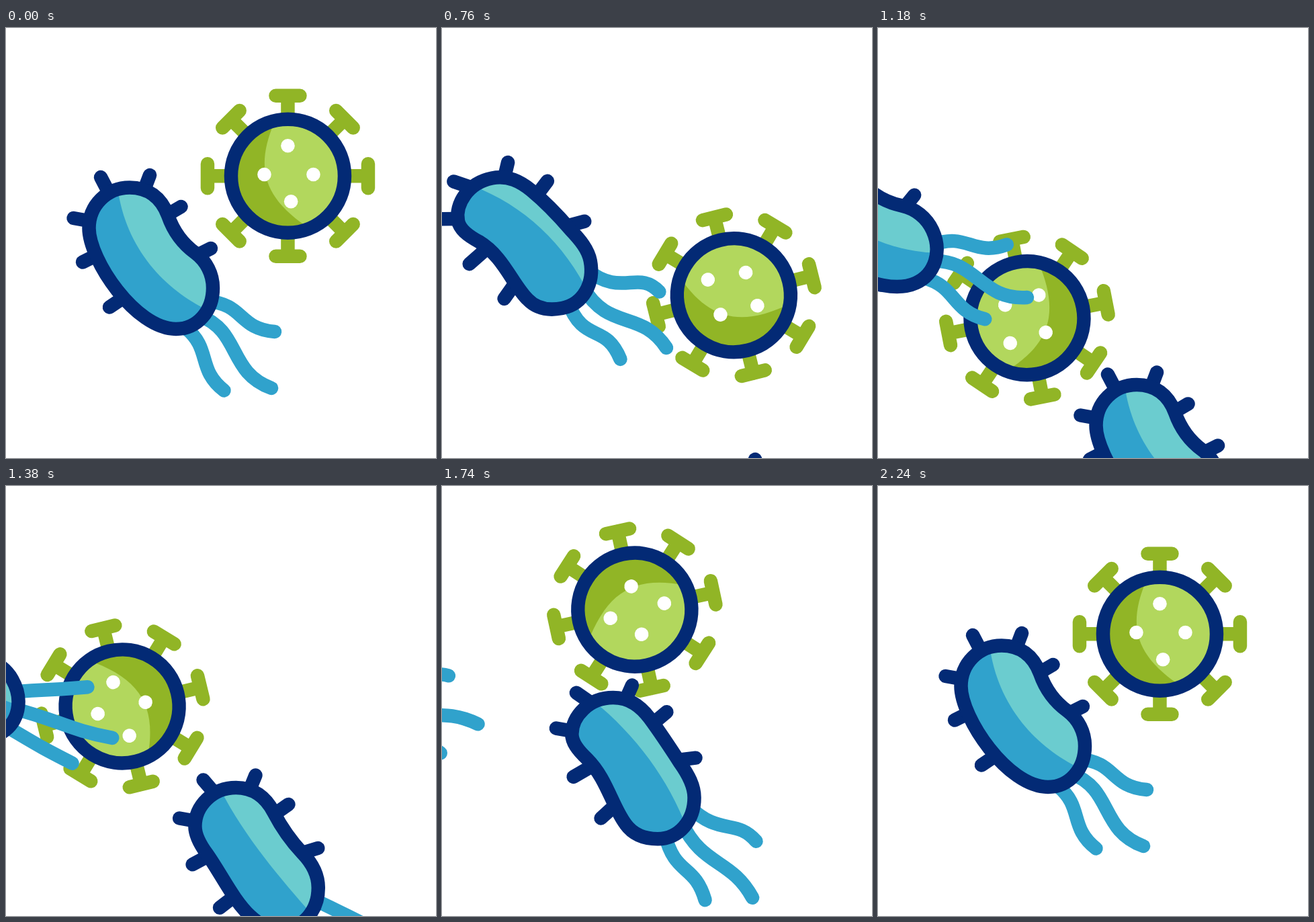
Recreate the animation shown at these times as an HTML page with a canvas. Size 640x640 px, loop 2400 ms.

```html
<!DOCTYPE html>
<html lang="en">
<head>
<meta charset="utf-8">
<title>Microbes</title>
<style>
  html, body { margin: 0; width: 100%; height: 100%; overflow: hidden; background: #fff; }
  canvas { display: block; width: 100vw; height: 100vh; }
</style>
</head>
<body>
<canvas id="stage" width="640" height="640"></canvas>
<script>
const ctx = document.getElementById('stage').getContext('2d');
const LOOP = 2400, STEP = 20;
const NAVY = '#032a75', BLUE = '#30a2cc', AQUA = '#6bcccf';
const GREEN = '#91b526', LIME = '#b2d75d';

// Smooth curve through (times, values), at rest at both ends and at turning points.
function track(times, values) {
  const last = times.length - 1;
  const rate = i => (values[i + 1] - values[i]) / (times[i + 1] - times[i]);
  const slopes = times.map((t, i) => {
    if (i === 0 || i === last) return 0;
    const a = rate(i - 1), b = rate(i);
    if (a * b <= 0) return 0;
    const h = times[i] - times[i - 1], k = times[i + 1] - times[i];
    return (a * k + b * h) / (h + k);
  });
  return t => {
    if (t <= times[0]) return values[0];
    if (t >= times[last]) return values[last];
    let i = 0;
    while (t >= times[i + 1]) i++;
    const h = times[i + 1] - times[i], u = (t - times[i]) / h, v = 1 - u;
    return v * v * (1 + 2 * u) * values[i] + u * u * (3 - 2 * u) * values[i + 1]
      + h * u * v * (v * slopes[i] - u * slopes[i + 1]);
  };
}

const KEYS = [200, 380, 760, 1180, 1560, 1920, 2240];
const keyed = (...values) => track(KEYS, values);

const virus = {
  orbit: keyed(-45.1, -33.6, 34.2, 131.3, 216.6, 289.2, 314.9),
  radius: keyed(140.9, 141, 138.3, 148.6, 144.4, 136.8, 140.9),
  turn: keyed(0, -8.4, -59, -146, -237.5, -321.3, -360)
};
const bend = track([200, 380, 720, 1200, 1600, 1920, 2240], [0, 0.4, 1.08, 0, 1.04, 0.58, 0]);

// Position and turn of the middle tail's tip.
const PIVOT = [395, 536];
const leaving = {
  x: keyed(395, 388, 334, 222, 102, 12, -40),
  y: keyed(536, 528, 476, 401, 359, 355, 360),
  turn: keyed(0, -1.2, -11, -24.4, -33, -36, -37)
};
const arriving = {
  x: keyed(665, 660, 645, 596, 507, 424, 395),
  y: keyed(1096, 1046, 958, 829.5, 674, 566, 536),
  turn: () => 0
};

// Each shape as a pair: bent one way, bent the other way.
const BODY = [
  `M123.5 298 C123.5 264 150 237.5 184 237.5 C211 237.5 231 252 241 279
   C249 302 264 322 282 335 C298 347 308 366 308 387 C308 421 285 448 253 448
   C238 448 222.4 441.6 207.4 431.2 C177.5 410.4 150.2 373.8 135.3 341.3
   C127.9 325 123.5 309.8 123.5 298 Z`,
  `M126.5 292 C126.5 266 152 238.5 188 238.5 C213 238.5 229 252 242 268
   C257 287 276 316 288 336 C300 354 308.5 370 308.5 387 C308.5 421 286 448.5 254 448.5
   C232 448.5 216 441 206 426 C187 399 181 357 150 328
   C135 315 126.5 304 126.5 292 Z`
];
const SHINE = [
  'M166 237 C178 330 238 390 300 420 L360 420 L360 200 L166 200 Z',
  'M157 243 C226 291 273 356 298 436 L360 436 L360 200 L157 200 Z'
];
const HAIRS = [
  `M141 222 L153 245 M214 219 L206 240 M260.5 266 L240 278 M305 328 L285 338
   M100.5 283 L123 287 M114 348.5 L135 338 M154 415.5 L174 402`,
  `M132 232 L153 245 M216 220 L207 240 M268 259 L252 273 M311 328 L288 330
   M103 284 L126 288 M130 357 L154 343 M171 418 L187 403`
];
const TAILS = [
  `M300 407 C354 410 346 448 400 452 M288 428 C350 452 330 512 395 536
   M268 447 C306 478 284 508 324.5 539.5`,
  `M301 400 C345 448 374 415 400.5 452 M290 424 C318 494 366 474 395 536
   M264 440 C277 507 311 482 324.5 539.5`
];

function morph([a, b], k) {
  const number = /[\d.]+/g, ends = b.match(number);
  let i = 0;
  return new Path2D(a.replace(number, n => (+n + (ends[i++] - n) * k).toFixed(2)));
}

const rad = deg => deg * Math.PI / 180;

function stroke(path, color) {
  ctx.strokeStyle = color;
  ctx.stroke(path);
}

function fill(path, color) {
  ctx.fillStyle = color;
  ctx.fill(path);
}

function disc(x, y, r) {
  const path = new Path2D();
  path.arc(x, y, r, 0, 2 * Math.PI);
  return path;
}

const STEM = new Path2D('M0 -84 V-119.5 M-18 -119.5 H18');
const CRESCENT = new Path2D('M-20 -80 C-50 -10 -35 35 35 80 L100 80 L100 -80 Z');
const DOTS = [[0, -45], [-35, -2.2], [38, -2.2], [4.7, 38]];

function drawVirus(t) {
  const a = rad(virus.orbit(t)), r = virus.radius(t);
  ctx.save();
  ctx.translate(320 + r * Math.cos(a), 320 + r * Math.sin(a));
  ctx.rotate(rad(virus.turn(t)));
  for (let i = 0; i < 8; i++) {
    stroke(STEM, GREEN);
    ctx.rotate(Math.PI / 4);
  }
  const core = disc(0, 0, 84.5);
  fill(core, GREEN);
  ctx.save();
  ctx.clip(core);
  fill(CRESCENT, LIME);
  ctx.restore();
  stroke(core, NAVY);
  for (const [x, y] of DOTS) fill(disc(x, y, 10.3), '#fff');
  ctx.restore();
}

function drawBacterium(pose, t) {
  const k = bend(t), body = morph(BODY, k);
  ctx.save();
  ctx.translate(pose.x(t), pose.y(t));
  ctx.rotate(rad(pose.turn(t)));
  ctx.translate(-PIVOT[0], -PIVOT[1]);
  stroke(morph(TAILS, k), BLUE);
  stroke(morph(HAIRS, k), NAVY);
  fill(body, BLUE);
  ctx.save();
  ctx.clip(body);
  fill(morph(SHINE, k), AQUA);
  ctx.restore();
  stroke(body, NAVY);
  ctx.restore();
}

const start = performance.now();

function draw(now) {
  const elapsed = Math.max(0, now - start) % LOOP;
  const t = Math.floor(elapsed / STEP) * STEP;
  ctx.fillStyle = '#fff';
  ctx.fillRect(0, 0, 640, 640);
  ctx.lineWidth = 20.5;
  ctx.lineCap = 'round';
  ctx.lineJoin = 'round';
  drawVirus(t);
  drawBacterium(leaving, t);
  drawBacterium(arriving, t);
  requestAnimationFrame(draw);
}
draw(start);
</script>
</body>
</html>
```
